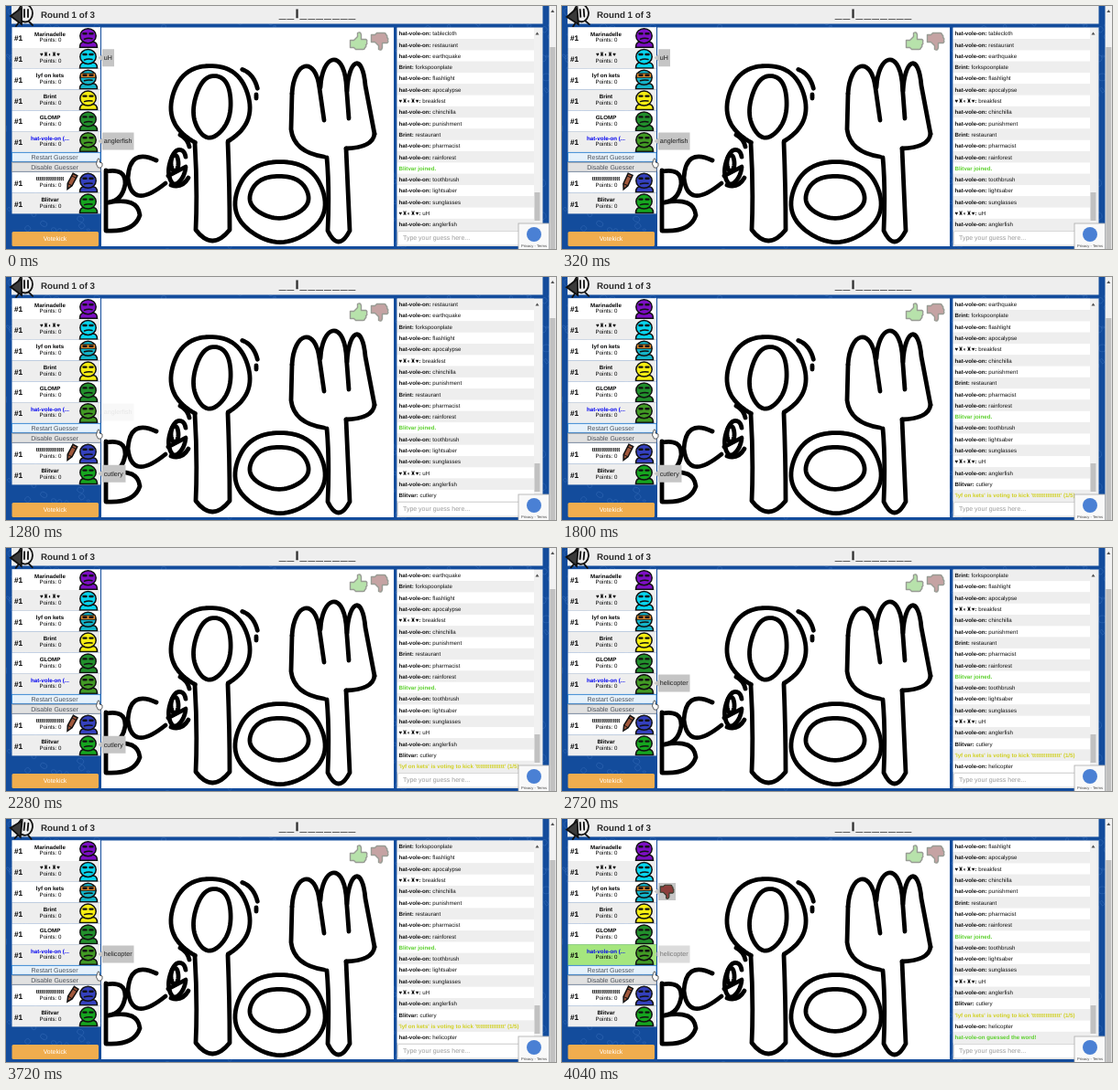
Write an HTML page that moves like this. It is 600 by 266 pixels and loops after 4.08 s.

```html
<!DOCTYPE html>
<html lang="en">
<head>
<meta charset="utf-8">
<title>Drawing game</title>
<style>
html, body { margin: 0; width: 100%; height: 100%; overflow: hidden; background: #134c9c; }
svg { display: block; width: 600px; height: 266px; }
text { font-family: "Liberation Sans", Arial, "DejaVu Sans", sans-serif; font-size: 6.15px; white-space: pre; text-rendering: geometricPrecision; }
.b { font-weight: 700; }
.mid { text-anchor: middle; }
.line { fill: none; stroke: #000; stroke-width: 4.8; stroke-linecap: round; stroke-linejoin: round; }
.word { font-size: 13px; letter-spacing: 1.6px; stroke: #2b2b2b; stroke-width: .35px; }
</style>
</head>
<body>
<svg id="stage" viewBox="0 0 600 266"></svg>
<script>
const LOOP = 4080, STEP = 40;
const stage = document.getElementById('stage');

function el(parent, tag, attrs = {}, text) {
  const node = document.createElementNS('http://www.w3.org/2000/svg', tag);
  for (const key in attrs) node.setAttribute(key, attrs[key]);
  if (text !== undefined) node.textContent = text;
  parent.appendChild(node);
  return node;
}
const group = (parent, attrs) => el(parent, 'g', attrs);
const rect = (parent, x, y, width, height, fill, more) =>
  el(parent, 'rect', { x, y, width, height, fill, ...more });
const label = (parent, x, y, text, more) => el(parent, 'text', { x, y, ...more }, text);
const path = (parent, d, more) => el(parent, 'path', { d, ...more });

// Seeded doodles on the wallpaper
let seed = 7;
const rnd = () => (seed = (seed * 16807) % 2147483647) / 2147483647;
rect(stage, 0, 0, 600, 266, '#134c9c');
const paper = group(stage, { fill: 'none', stroke: '#3a70bb', 'stroke-width': 0.8, opacity: 0.6 });
for (let i = 0; i < 420; i++) {
  const place = `translate(${rnd() * 600} ${rnd() * 266}) rotate(${rnd() * 360})`;
  const size = 3 + rnd() * 5;
  rect(paper, 0, 0, size, size * (0.4 + rnd()), 'none', { rx: rnd() * 4, transform: place });
}

// Header
rect(stage, 6, 0, 579.5, 19.5, '#eee');
label(stage, 38, 13, 'Round 1 of 3', { class: 'b', style: 'font-size:9.75px', fill: '#2b2b2b' });
label(stage, 298, 13, '__l_______', { class: 'b word', fill: '#2b2b2b' });

const clock = group(stage, { stroke: '#111', 'stroke-width': 1.8, 'stroke-linecap': 'round' });
el(clock, 'ellipse', { cx: 21, cy: 8, rx: 8, ry: 9.5, fill: '#eee' });
path(clock, 'M5,11L17,2V20Z', { fill: '#3a3a3a' });
path(clock, 'M20,4v8M24,4v8M14,18l-3,4M25,17l4,4', { fill: 'none' });

// Players
const players = [
  ['Marinadelle', '#7d0fc4'], ['♥♜◐♜♥', '#08d5ee'], ['lyf on kets', '#14b4c8'],
  ['Brint', '#f6ee12'], ['GLOMP', '#22902c'], ['hat-vole-on (...', '#429a24'],
  ['t'.repeat(15), '#3440bd'], ['Blitvar', '#16a51f']
];
const GUESSER = 5, DRAWER = 6, MASKED = 2;
const rowTop = i => 23.2 + 22.8 * i + (i >= DRAWER ? 21.8 : 0);

function avatar(y, color, masked) {
  const g = group(stage, { transform: `translate(89.5 ${y})`, stroke: '#111', 'stroke-width': 1.5, 'stroke-linecap': 'round' });
  path(g, 'M-9,22Q-9,16 -4,16H5Q10,16 10,22Z', { fill: color });
  el(g, 'ellipse', { cx: 0, cy: 9.5, rx: 8.7, ry: 8, fill: color });
  if (masked) rect(g, -8, 5, 16, 4.5, '#e58a2a', { 'stroke-width': 0.8 });
  path(g, 'M-5,7h3M2,7h3', { 'stroke-width': 2.4 });
  path(g, 'M-4,13Q0,11.5 4.5,12.5', { fill: 'none' });
}

const rowBack = players.map(([name, color], i) => {
  const y = rowTop(i);
  const back = rect(stage, 6.5, y, 96.5, 22.8, i % 2 ? '#eee' : '#fff');
  label(stage, 9, y + 15, '#1', { class: 'b', style: 'font-size:8.3px' });
  label(stage, 48, y + 9.3, name, { class: 'b mid', fill: i === GUESSER ? '#0000f0' : '#000' });
  label(stage, 48.5, y + 16.2, 'Points: 0', { class: 'mid' });
  avatar(y, color, i === MASKED);
  return back;
});

function button(y, text, fill, border) {
  rect(stage, 6.5, y, 96.5, 10, fill, { stroke: border, 'stroke-width': 0.8 });
  label(stage, 53, y + 7.4, text, { class: 'mid', style: 'font-size:7px', fill: '#4b5058' });
}
button(160.3, 'Restart Guesser', '#e5f1fb', '#2b83d4');
button(171.2, 'Disable Guesser', '#e1e1e1', '#a4a4a4');

const pencil = group(stage, { stroke: '#111', 'stroke-width': 1.5 });
path(pencil, 'M-2.7,-8.5H2.7V4L0,9.5L-2.7,4Z', { fill: '#a0583c' });
path(pencil, 'M-2.7,4H2.7M-2.7,-5.5H2.7', { 'stroke-width': 0.9 });

rect(stage, 6.5, 247, 94.5, 16, '#f0ad4e', { rx: 1.5 });
label(stage, 53.5, 257.4, 'Votekick', { class: 'mid', style: 'font-size:6.9px', fill: '#fff' });

// Canvas and its drawing
rect(stage, 104, 23.5, 319, 239.5, '#fff');
const art = group(stage, { class: 'line' });
const ink = d => path(art, d);

// Hand-drawn arc: angles in degrees, clockwise from the right
function arc(cx, cy, rx, ry, from = 0, to = 360, tilt = 0) {
  const pts = [], k = Math.PI / 180;
  for (let a = from; a <= to; a += 5) {
    const wobble = 1 + 0.012 * Math.sin(a * k * 5);
    pts.push([cx + rx * wobble * Math.cos(a * k), cy + ry * wobble * Math.sin(a * k)]);
  }
  path(art, 'M' + pts.join('L'), { transform: `rotate(${tilt} ${cx} ${cy})` });
}
const handle = (x1, y1, x2, y2, w, end) =>
  ink(`M${x1},${y1}Q${x1 + 3},200 ${x1 + 1},${end - 12}Q${x1 + w / 2},${end + 12} ${x1 + w},${end - 12}Q${x2 + 2},200 ${x2},${y2}`);
const tine = (x, w, top, endX, endY) =>
  ink(`M${x},${top + 30}C${x + 2},${top - 6} ${x + w * 0.85},${top - 12} ${x + w},${top + 24}L${endX},${endY}`);

// spoon
arc(223, 109, 43, 44, 113, 423);
arc(225, 110, 20, 34, 0, 360, 7);
arc(245, 95, 30, 28, -65, -10);
ink('M273,97v4');
handle(206, 150, 242, 149, 38, 257);
// fork
tine(312, 30, 66, 347, 125);
tine(343, 28, 59, 374, 123);
tine(372, 20, 63, 402, 140);
ink('M312,96L311,135Q314,160 347,165');
ink('M402,140Q400,155 371,156');
handle(350, 166, 371, 156, 25, 258);
// plate
arc(299, 214, 49, 44);
arc(298, 209, 32, 23);
// letters
ink('M109,180V246M109,181q22,-4 21,14q-3,18 -18,20q32,-6 34,14q-6,19 -37,17');
ink('M164,169Q135,155 133,188Q137,224 174,194');
arc(187, 176, 9, 19, 0, 320, 10);
arc(184, 172, 4, 9);
ink('M177,186L196,176M180,196q12,4 19,-8M190,141q8,4 10,13');

const THUMB = 'M-9,-1H-5L-1,-5V-9Q2,-11 3,-7V-2H8Q10,-1 9,1Q10,3 8,4Q9,6 7,7Q7,9 5,9H-3L-5,7H-9Z';
function thumb(parent, x, y, fill, flip, size, opacity) {
  path(parent, THUMB, {
    transform: `translate(${x} ${y}) scale(${size} ${flip ? -size : size})`,
    fill, opacity, stroke: '#343b2c', 'stroke-width': 1.4, 'stroke-linejoin': 'round'
  });
}
thumb(stage, 384.5, 38.5, '#72c65a', false, 1, 0.5);
thumb(stage, 407.5, 38.5, '#8c4a49', true, 1, 0.5);

// Speech bubbles: player, width, shown from, gone at, text
const FADE = 300;
const bubbles = [
  [1, 13, -1, 1100, 'uH'], [5, 34.5, -1, 1310, 'anglerfish'],
  [7, 25.5, 1120, 2600, 'cutlery'], [5, 34.5, 2480, 4220, 'helicopter'],
  [2, 19, 3760, 5600, '']
].map(([row, w, from, to, text]) => {
  const y = rowTop(row) + 1.2, g = group(stage);
  path(g, `M100.5,${y + 9.5}L105,${y + 6}V${y}H${105 + w}V${y + 19}H105V${y + 13}Z`, { fill: '#c5c5c5' });
  if (text) label(g, 106.8, y + 12, text, { style: 'font-size:7.1px', fill: '#1c1c1c' });
  else thumb(g, 114.5, y + 9.5, '#8c3f3c', true, 0.8, 1);
  return { g, from, to };
});

// Chat
rect(stage, 426.5, 23.5, 159, 239.5, '#eee');
const clip = el(el(stage, 'defs'), 'clipPath', { id: 'chat' });
rect(clip, 426.5, 23.8, 149.5, 221.8);
const log = group(group(stage, { 'clip-path': 'url(#chat)' }));
const PITCH = 12.3, SHOWN = 18;
const H = 'hat-vole-on', B = 'Brint', S = players[1][0], G = '#5bd02c';
const messages = [
  [H, 'tablecloth'], [H, 'restaurant'], [H, 'earthquake'], [B, 'forkspoonplate'],
  [H, 'flashlight'], [H, 'apocalypse'], [S, 'breakfest'], [H, 'chinchilla'],
  [H, 'punishment'], [B, 'restaurant'], [H, 'pharmacist'], [H, 'rainforest'],
  ['', 'Blitvar joined.', G], [H, 'toothbrush'], [H, 'lightsaber'], [H, 'sunglasses'],
  [S, 'uH'], [H, 'anglerfish'], ['Blitvar', 'cutlery'],
  ['', `'lyf on kets' is voting to kick '${players[DRAWER][0]}' (1/5)`, '#d0d022'],
  [H, 'helicopter'], ['', H + ' guessed the word!', G]
];
const arrivals = [1120, 1720, 2480, 3800];
const lines = messages.map(([who, text, color], i) => {
  const y = 23.8 + PITCH * i, g = group(log);
  rect(g, 426.5, y, 150, PITCH, i % 2 ? '#eee' : '#fff');
  const t = label(g, 428.5, y + 8.4, '', { fill: color || '#111' });
  if (who) el(t, 'tspan', { class: 'b' }, who + ': ');
  el(t, 'tspan', color ? { class: 'b' } : {}, text);
  return g;
});
rect(stage, 576, 24, 7, 221.5, '#f1f1f1');
rect(stage, 576.5, 204, 6, 31, '#c1c1c1');
const arrow = (x, y, h) => path(stage, `M${x - 2},${y}h4l-2,${h}Z`, { fill: '#505050' });
arrow(579.5, 31.5, -3);
arrow(579.5, 239, 3);
rect(stage, 427.5, 246.5, 156, 15.5, '#fff', { stroke: '#ccc', 'stroke-width': 0.7, rx: 1.5 });
label(stage, 433, 256.3, 'Type your guess here...', { style: 'font-size:7px', fill: '#999' });

// Page scrollbar
rect(stage, 592.5, 0, 7.5, 266, '#f1f1f1');
rect(stage, 593.3, 45, 6, 221, '#c1c1c1');
arrow(596.3, 7, -3);

// Badge
rect(stage, 559, 238, 33.5, 30, '#f9f9f9', { stroke: '#aaa', 'stroke-width': 0.8 });
el(stage, 'circle', { cx: 576, cy: 250, r: 8, fill: '#4a80d4' });
label(stage, 576, 263.7, 'Privacy - Terms', { class: 'mid', style: 'font-size:4.1px', fill: '#444' });

// Pointer
path(stage, 'M100,167.5Q101.5,166 102,168V171L105,172V175L103.5,177H100.5L98.5,173Z', { fill: '#fff', stroke: '#222', 'stroke-width': 0.7 });

function draw(t) {
  const count = SHOWN + arrivals.filter(a => t >= a).length;
  lines.forEach((g, i) => g.setAttribute('visibility', i < count ? 'visible' : 'hidden'));
  log.setAttribute('transform', `translate(0 ${-(count - SHOWN) * PITCH})`);
  bubbles.forEach(({ g, from, to }) => {
    const fade = Math.max(0, Math.min(1, (to - t) / FADE));
    g.setAttribute('opacity', t >= from ? fade : 0);
  });
  rowBack[GUESSER].setAttribute('fill', count === messages.length ? '#a5e67e' : '#eee');
  const swing = Math.sin(t / LOOP * 2 * Math.PI * 8);
  clock.setAttribute('transform', `rotate(${swing * 6} 18 8)`);
  pencil.setAttribute('transform', `translate(${71.5 + swing * 0.6} 192) rotate(${28 + swing * 5})`);
}

const start = performance.now();
function tick() {
  const t = (performance.now() - start) % LOOP;
  draw(Math.floor(t / STEP) * STEP);
  requestAnimationFrame(tick);
}
tick();
</script>
</body>
</html>
```
